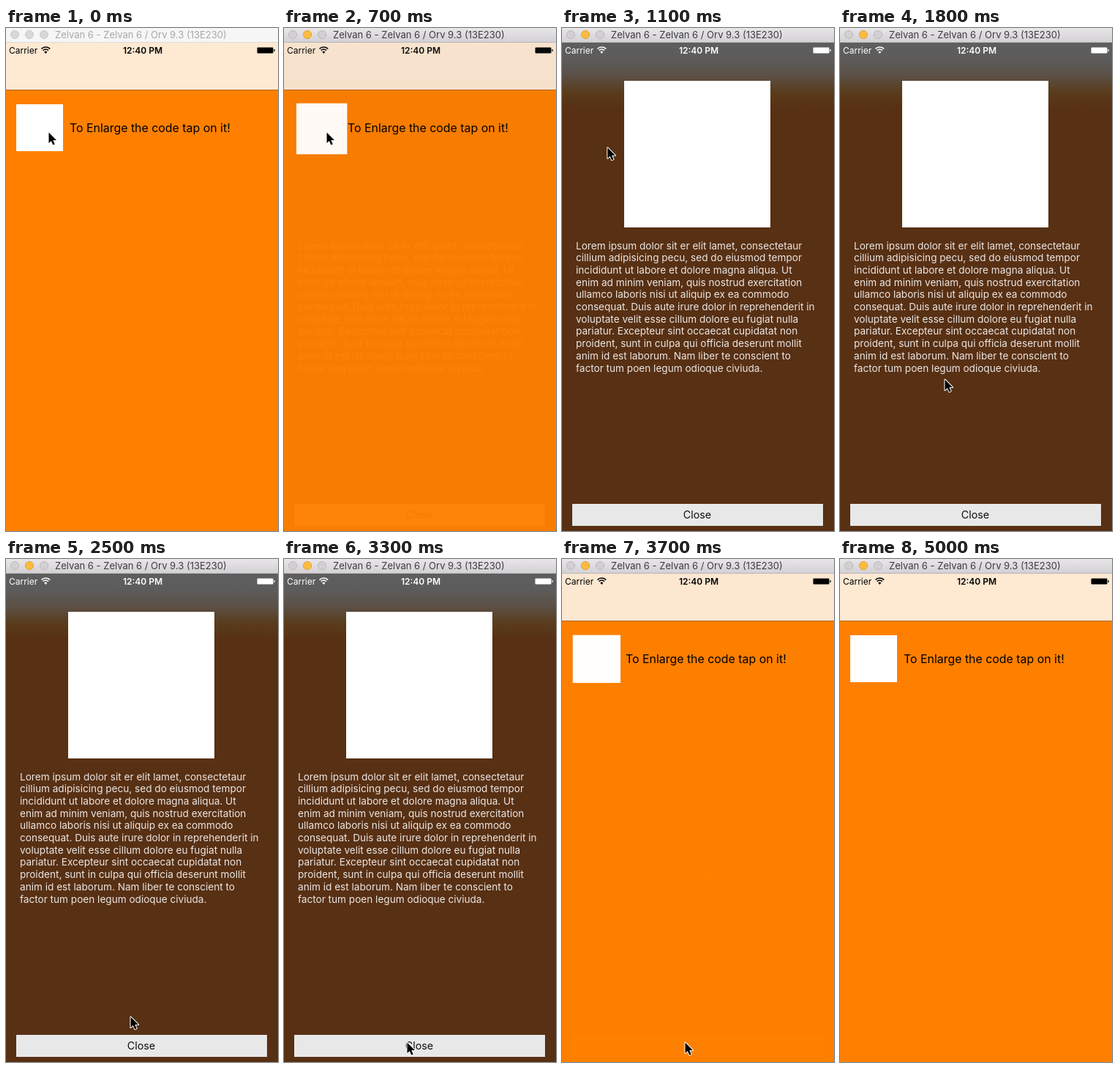
Write an HTML page with a canvas that moves like this. It is 372 by 686 pixels and loops after 5.2 s.

```html
<!DOCTYPE html>
<html lang="en">
<head>
<meta charset="utf-8">
<title>Enlarge the code</title>
<style>
  html, body { margin: 0; width: 100%; height: 100%; overflow: hidden; background: #ff8000; }
  canvas { display: block; }
</style>
</head>
<body>
<canvas id="stage" width="372" height="686"></canvas>
<script>
const stage = document.getElementById('stage').getContext('2d');
const layer = stage.canvas.cloneNode().getContext('2d');
let g = stage; // context the helpers draw into

const LOOP = 5200, STEP = 100;
const FADE = 380, OPEN = 654, CLOSE = 3342;
const ACTIVE = 500, CURSOR_OFF = 4300;

const LOREM = [
  'Lorem ipsum dolor sit er elit lamet, consectetaur',
  'cillium adipisicing pecu, sed do eiusmod tempor',
  'incididunt ut labore et dolore magna aliqua. Ut',
  'enim ad minim veniam, quis nostrud exercitation',
  'ullamco laboris nisi ut aliquip ex ea commodo',
  'consequat. Duis aute irure dolor in reprehenderit in',
  'voluptate velit esse cillum dolore eu fugiat nulla',
  'pariatur. Excepteur sint occaecat cupidatat non',
  'proident, sunt in culpa qui officia deserunt mollit',
  'anim id est laborum. Nam liber te conscient to',
  'factor tum poen legum odioque civiuda.'
];

// time, x, y of the pointer tip
const PATH = [
  [1050, 58, 142], [1600, 100, 370], [1800, 143, 479],
  [2200, 160, 537], [2500, 170, 624], [2800, 169, 648], [3000, 168, 659]
];

const mix = (a, b, k) => a + (b - a) * k;
const clamp = v => Math.min(1, Math.max(0, v));
const ease = u => u * u * (3 - 2 * u);
const ramp = (t, start) => ease(clamp((t - start) / FADE));

function rect(x, y, w, h, color) {
  g.fillStyle = color;
  g.fillRect(x, y, w, h);
}

function text(str, x, y, size, color, weight = 400, align = 'left') {
  g.font = `${weight} ${size}px Inter, "Liberation Sans", sans-serif`;
  g.textAlign = align;
  g.fillStyle = color;
  g.fillText(str, x, y);
}

function vertical(y0, y1, ...colors) {
  const fill = g.createLinearGradient(0, y0, 0, y1);
  colors.forEach((c, i) => fill.addColorStop(i / (colors.length - 1), c));
  return fill;
}

function titleBar(active) {
  rect(0, 0, 372, 20, active ? vertical(0, 20, '#e9e6e9', '#d2d0d3') : '#f6f6f6');
  rect(0, 19, 372, 1, active ? '#b9b6b9' : '#dcdcdc');
  [12, 32, 52].forEach((x, i) => {
    const lit = active && i === 1;
    g.beginPath();
    g.arc(x, 9, 5.5, 0, 7);
    g.fillStyle = lit ? '#fdbc40' : active ? '#d3d0d3' : '#d8d8d8';
    g.strokeStyle = lit ? '#dfa032' : active ? '#bcb9bc' : '#cacaca';
    g.lineWidth = 1;
    g.fill();
    g.stroke();
  });
  text('Zelvan 6 - Zelvan 6 / Orv 9.3 (13E230)', 67, 14, 13, active ? '#3d3c3d' : '#a8a8a8');
}

function statusBar(p) {
  const v = Math.round(255 * p), ink = `rgb(${v},${v},${v})`;
  text('Carrier', 4, 34.5, 12, ink);
  text('12:40 PM', 187, 34.5, 12, ink, 600, 'center');
  g.strokeStyle = ink;
  g.lineWidth = 1.7;
  for (const r of [8, 5]) {
    g.beginPath();
    g.arc(54.3, 34, r, -Math.PI * 0.76, -Math.PI * 0.24);
    g.stroke();
  }
  g.beginPath();
  g.moveTo(54.3, 35);
  g.arc(54.3, 34.5, 2.8, -Math.PI * 0.76, -Math.PI * 0.24);
  g.fill();
  g.lineWidth = 0.5;
  g.beginPath();
  g.roundRect(343.5, 26.5, 22, 8, 1.5);
  g.stroke();
  rect(344, 27, 21, 7, ink);
  rect(366.5, 29, 1.2, 3, ink);
}

function home() {
  rect(0, 0, 372, 686, '#ff8000');
  rect(0, 20, 372, 64, '#fee9d3');
  rect(0, 84, 372, 1, '#b0662a');
  text('To Enlarge the code tap on it!', 87, 142, 15.9, '#000');
}

// Blurred backdrop while open, plain dark tint while closing; faded as one group.
function sheet(p, closing) {
  g = layer;
  g.clearRect(0, 0, 372, 686);
  if (closing) {
    rect(0, 20, 372, 666, 'rgba(22,22,22,.68)');
  } else {
    rect(0, 20, 372, 666, '#583014');
    rect(0, 20, 372, 90, vertical(20, 110, '#5e5e5f', '#5d5c5b', '#5b5046', '#593c1c', '#583014'));
  }
  LOREM.forEach((line, i) => text(line, 19, 301.5 + i * 16.7, 13.6, '#ebe7e4'));
  rect(14, 649, 343, 30, '#e8e8e8');
  text('Close', 185, 669, 14.3, '#111', 400, 'center');
  g = stage;
  g.globalAlpha = p;
  g.drawImage(layer.canvas, 0, 0);
  g.globalAlpha = 1;
}

function card(p) {
  const size = mix(64, 200, p);
  g.globalAlpha = 1 - p * (1 - p);
  rect(mix(14, 85, p), mix(104, 72, p), size, size, '#fff');
  g.globalAlpha = 1;
}

function pointerAt(t) {
  const i = PATH.findIndex(k => k[0] > t);
  if (i === 0) return PATH[0].slice(1);
  if (i < 0) return PATH[PATH.length - 1].slice(1);
  const [t0, x0, y0] = PATH[i - 1], [t1, x1, y1] = PATH[i];
  const k = (t - t0) / (t1 - t0);
  return [mix(x0, x1, k), mix(y0, y1, k)];
}

function pointer(x, y) {
  const arrow = new Path2D('M.5 .5V15l3.3-3.1 2.5 5.5 2.4-1-2.4-5.4H11z');
  g.save();
  g.translate(x, y);
  g.lineJoin = 'round';
  g.lineWidth = 2;
  g.strokeStyle = '#fff';
  g.stroke(arrow);
  g.fillStyle = '#000';
  g.fill(arrow);
  g.restore();
}

function draw(t) {
  const p = ramp(t, OPEN) - ramp(t, CLOSE);
  home();
  if (p > 0) sheet(p, t > CLOSE);
  card(p);
  statusBar(p);
  titleBar(t >= ACTIVE);
  if (t < CURSOR_OFF) pointer(...pointerAt(t));
}

function tick() {
  const t = performance.now() % LOOP;
  draw(Math.floor(t / STEP) * STEP);
  requestAnimationFrame(tick);
}
tick();
</script>
</body>
</html>
```
